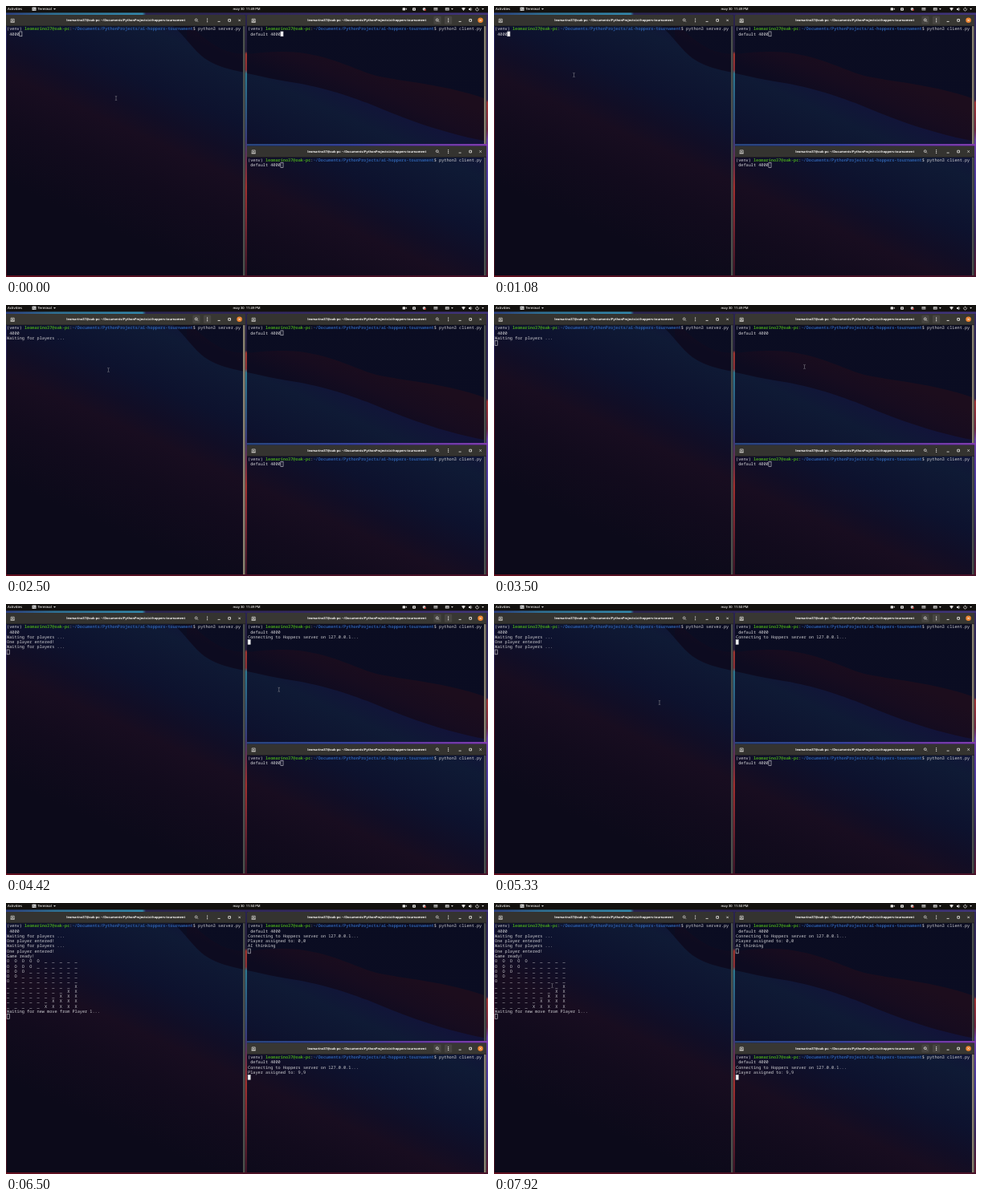
An HTML page for the animation above (8000 ms loop, 600x338 px).

```html
<!DOCTYPE html>
<html lang="en">
<head>
<meta charset="utf-8">
<title>Terminal session</title>
<style>
html, body { margin: 0; width: 100%; height: 100%; overflow: hidden; background: #0c0c20; }
svg { display: block; width: 100vw; height: 100vh; }
text { white-space: pre; text-rendering: geometricPrecision; }
.mono { font: 5.233px "Noto Sans Mono", "DejaVu Sans Mono", monospace; fill: #d2d2d6; }
.user { font-weight: 700; fill: #469f1b; }
.path { font-weight: 700; fill: #2c5ca6; }
.ui { font: 600 4.1px "Open Sans", "Noto Sans", sans-serif; fill: #f0eeec; }
.title { font: 700 3.92px "Open Sans", "Noto Sans", sans-serif; fill: #f8f6f4; text-anchor: middle; }
</style>
</head>
<body>
<svg id="stage" viewBox="0 0 600 338" preserveAspectRatio="none">
  <defs>
    <linearGradient id="sky" x2="0" y2="1">
      <stop offset="0" stop-color="#0b0d22"/><stop offset=".4" stop-color="#0a0c22"/>
    </linearGradient>
    <linearGradient id="ridge" gradientUnits="userSpaceOnUse" x1="430" y1="60" x2="405" y2="118">
      <stop offset="0" stop-color="#1c0d1d"/><stop offset=".5" stop-color="#170c1f"/><stop offset="1" stop-color="#0d0b20"/>
    </linearGradient>
    <linearGradient id="land" gradientUnits="userSpaceOnUse" x1="0" y1="-100" x2="-120" y2="166">
      <stop offset="0" stop-color="#13123a"/><stop offset=".15" stop-color="#0f1a35"/>
      <stop offset=".36" stop-color="#0d122e"/><stop offset=".48" stop-color="#110e26"/>
      <stop offset=".58" stop-color="#180d20"/><stop offset=".75" stop-color="#120b1d"/><stop offset="1" stop-color="#0c0a1a"/>
    </linearGradient>
    <linearGradient id="topStrip">
      <stop offset="0" stop-color="#2c3f80"/><stop offset=".1" stop-color="#2f6f92"/><stop offset=".283" stop-color="#3388ac"/>
      <stop offset=".29" stop-color="#29244f"/><stop offset=".6" stop-color="#33295f"/><stop offset="1" stop-color="#41357c"/>
    </linearGradient>
    <linearGradient id="midStrip" x2="0" y2="1">
      <stop offset="0" stop-color="#2b2450"/><stop offset=".14" stop-color="#231c3a"/>
      <stop offset=".15" stop-color="#a03530"/><stop offset=".21" stop-color="#8a3036"/>
      <stop offset=".225" stop-color="#2d7890"/><stop offset=".36" stop-color="#2d5a82"/>
      <stop offset=".48" stop-color="#3a3a7c"/><stop offset=".56" stop-color="#6e2f4c"/>
      <stop offset=".66" stop-color="#a2302e"/><stop offset=".78" stop-color="#822832"/><stop offset="1" stop-color="#3a1226"/>
    </linearGradient>
    <linearGradient id="rightStrip" x2="0" y2="1">
      <stop offset="0" stop-color="#33285f"/><stop offset=".325" stop-color="#2c2350"/>
      <stop offset=".335" stop-color="#a03336"/><stop offset=".44" stop-color="#722844"/>
      <stop offset=".48" stop-color="#6c40a8"/><stop offset=".66" stop-color="#46389a"/>
      <stop offset=".85" stop-color="#39235a"/><stop offset="1" stop-color="#5a162c"/>
    </linearGradient>
    <linearGradient id="leftStrip" x2="0" y2="1">
      <stop offset="0" stop-color="#2c2c74"/><stop offset=".25" stop-color="#38204c"/>
      <stop offset=".4" stop-color="#64162a"/><stop offset="1" stop-color="#521222"/>
    </linearGradient>
    <linearGradient id="splitStrip">
      <stop offset="0" stop-color="#27457c"/><stop offset=".45" stop-color="#36409a"/>
      <stop offset=".62" stop-color="#5c389e"/><stop offset="1" stop-color="#803cae"/>
    </linearGradient>
    <linearGradient id="bottomStrip">
      <stop offset="0" stop-color="#62101f"/><stop offset=".5" stop-color="#4a1124"/><stop offset="1" stop-color="#481228"/>
    </linearGradient>
  </defs>
</svg>
<script>
const LOOP = 8000, TICK = 1000 / 12;
const CHAR = 3.14, LINE = 6.265;
const HOST = "leomarino37@oak-pc", DIR = "~/Documents/PythonProjects/ai-hoppers-tournament";
const stage = document.getElementById("stage");

function add(parent, tag, attrs, html) {
  const el = document.createElementNS("http://www.w3.org/2000/svg", tag);
  for (const k in attrs) el.setAttribute(k, attrs[k]);
  if (html) el.innerHTML = html;
  parent.appendChild(el);
  return el;
}
const rect = (p, x, y, width, height, fill, more) => add(p, "rect", { x, y, width, height, fill, ...more });
const path = (p, d, fill, more) => add(p, "path", { d, fill, ...more });
const line = (p, d, stroke, more) => path(p, d, "none", { stroke, "stroke-width": 0.7, ...more });
const show = (el, on) => el.setAttribute("visibility", on ? "visible" : "hidden");
const clamp = v => Math.max(0, Math.min(1, v));

function drawWallpaper() {
  rect(stage, 0, 0, 600, 338, "url(#sky)");
  path(stage, "M225 20C250 45 270 60 300 60C325 57 345 56 365 58C410 64 435 80 461 87C490 94 550 98 600 117V180H225Z", "url(#ridge)");
  path(stage, "M0 20H200C222 32 232 58 255 70C270 78 285 80 300 84C320 88 335 92 355 95C400 102 430 114 450 121C490 138 540 158 600 169V338H0Z", "url(#land)");
  rect(stage, 0, 8, 600, 3, "url(#topStrip)");
  rect(stage, 297.6, 11, 2.4, 326, "url(#midStrip)");
  rect(stage, 598, 11, 2, 326, "url(#rightStrip)");
  rect(stage, 300, 172, 300, 2.6, "url(#splitStrip)");
  rect(stage, 0, 11, 0.8, 326, "url(#leftStrip)");
  rect(stage, 0, 336, 600, 2, "url(#bottomStrip)");
}

function drawTopBar() {
  rect(stage, 0, 0, 600, 8.4, "#13110f");
  const label = (x, s, more) => add(stage, "text", { class: "ui", x, y: 5.2, ...more }, s);
  label(2, "Activities");
  rect(stage, 32.5, 1.6, 5, 4.4, "#c9c9c9", { rx: 0.6 });
  line(stage, "M33.5 2.8l1 .9l-1 .9M35.2 4.8h1.4", "#222", { "stroke-width": 0.5 });
  label(39.5, "Terminal");
  path(stage, "M59 3h3l-1.5 1.8z", "#ddd");
  const ink = "#e2e0de";
  rect(stage, 493.6, 2.2, 3.4, 3.2, ink, { rx: 0.5 });
  path(stage, "M497.2 3.7l1.6-1.2v2.6z", ink);
  rect(stage, 506, 2.2, 4, 3.6, ink, { rx: 1 });
  add(stage, "circle", { cx: 508, cy: 4, r: 0.8, fill: "#222" });
  add(stage, "circle", { cx: 520.5, cy: 3.8, r: 1.9, fill: "#c9c6c6" });
  add(stage, "circle", { cx: 521.8, cy: 5, r: 1, fill: "#d84038" });
  rect(stage, 532.5, 2, 4.8, 3.6, "#bbb9b7", { rx: 0.4 });
  line(stage, "M533 3.2h3.8M533 4.4h3.8", "#333", { "stroke-width": 0.4 });
  rect(stage, 546.8, 2.2, 4.8, 3.4, ink, { rx: 0.4 });
  line(stage, "M547.5 3.4h3.4M547.5 4.5h3.4", "#333", { "stroke-width": 0.5 });
  path(stage, "M554 3h2.8l-1.4 1.7z", ink);
  path(stage, "M567 2.8q2.5-1.7 5 0l-2.5 3.2z", ink);
  path(stage, "M576 3.1h1.2l1.4-1.3v4.4l-1.4-1.3h-1.2z", ink);
  line(stage, "M579.4 2.6q.9 1.4 0 2.8", ink, { "stroke-width": 0.5 });
  line(stage, "M585.3 2.6a1.9 1.9 0 1 0 2.4 0M586.5 1.6v2.2", ink);
  path(stage, "M592.2 3h2.8l-1.4 1.7z", ink);
  return label(299.5, "", { "text-anchor": "middle" });
}

const prompt = file => `(venv) <tspan class="user">${HOST}</tspan>:<tspan class="path">${DIR}</tspan>$ python3 ${file}`;

// rows: [time, text]; cursor: [time, row, column, style]
function makeTerminal(x, top, bottom, rows, cursor, focus) {
  const g = add(stage, "g", { transform: `translate(${x} ${top})` });
  const height = bottom - top;
  rect(g, 0, 0, 298, 14, "#343330", { rx: 1 });
  const lit = rect(g, 0, 0, 298, 14, "#383733", { rx: 1 });
  rect(g, 0, 13.6, 298, 0.6, "#1b191b");
  const icons = add(g, "g");
  const tools = add(icons, "g");
  for (const cx of [237, 250.6]) rect(tools, cx - 4.6, 1.8, 9.2, 10, "#474542", { rx: 1.2 });
  const ink = "#efece9";
  line(icons, "M6.2 5.2h4v3.8h-4zM5.4 9.2h5.4M8.2 6v2M7.2 7h2", ink);
  add(icons, "circle", { cx: 236.7, cy: 6.4, r: 1.4, fill: "none", stroke: ink, "stroke-width": 0.8 });
  line(icons, "M237.8 7.5l1.3 1.3", ink);
  for (const cy of [4.9, 6.8, 8.7]) add(icons, "circle", { cx: 250.6, cy, r: 0.65, fill: ink });
  line(icons, "M263.6 8.4h3M276.8 5.5h2.7v2.7h-2.7z", ink, { "stroke-width": 0.9 });
  const close = add(icons, "circle", { cx: 290.6, cy: 6.8, r: 3.3, fill: "#ee8430" });
  line(icons, "M289.4 5.6l2.4 2.4M291.8 5.6l-2.4 2.4", ink, { "stroke-width": 0.8 });
  add(g, "text", { class: "title", x: 149.2, y: 8.1 }, `${HOST}: ${DIR}`);

  rect(g, 295, 14.2, 2.4, height - 14.2, "#4b504c");
  const bar = rect(g, 295, 14.2, 2.4, height - 14.2, "#88816e");

  const texts = rows.map(([at, s], i) =>
    ({ at, el: add(g, "text", { class: "mono", x: 1, y: 19.4 + i * LINE }, s) }));
  const block = rect(g, 0, 0, 3.1, 5.8, "#f2f2f4", { stroke: "#d4d4d8", "stroke-width": 0.6 });

  return (t, q) => {
    texts.forEach(r => show(r.el, t >= r.at));
    const [, row, col, style] = cursor.filter(c => t >= c[0]).pop();
    show(block, style !== "off");
    block.setAttribute("x", 1.1 + col * CHAR);
    block.setAttribute("y", 14.7 + row * LINE);
    block.setAttribute("fill-opacity", style === "full" ? 1 : 0);
    const f = focus(q);
    for (const el of [lit, tools, close, bar]) el.setAttribute("opacity", f);
    icons.setAttribute("opacity", 0.9 + 0.1 * f);
  };
}

function board() {
  const n = 10, out = [];
  for (let r = 0; r < n; r++) {
    let s = "";
    for (let c = 0; c < n; c++) s += (r + c < 5 ? "O" : r + c > 13 ? "X" : "_") + "  ";
    out.push([6410, s]);
  }
  return out;
}

// Pointer stops: [time, x, y]
const stops = [
  [170, 137, 115], [550, 63, 127], [920, 99.5, 86], [2415, 99.5, 86], [2500, 127.5, 81],
  [3250, 386.5, 77], [4080, 386.5, 77], [4165, 389, 77], [4250, 389, 77], [4700, 230, 173],
  [5083, 71, 140], [5333, 206, 123], [5916, 360.5, 225], [6850, 360.5, 225],
  [7333, 123, 84], [7667, 150, 114], [7916, 72.5, 103]
];
const hidden = [[1920, 2495], [3750, 4075], [6330, 6910]];

function pointerAt(t) {
  const i = stops.findIndex(s => s[0] > t);
  if (i === 0) return stops[0].slice(1);
  if (i < 0) return stops[stops.length - 1].slice(1);
  const [t0, x0, y0] = stops[i - 1], [t1, x1, y1] = stops[i];
  const u = (t - t0) / (t1 - t0), e = u * u * (3 - 2 * u);
  return [x0 + (x1 - x0) * e, y0 + (y1 - y0) * e];
}

drawWallpaper();
const clock = drawTopBar();
const fade = (q, start) => clamp((q - start) / 250);
const waiting = "Waiting for players ...", entered = "One player entered!";
const connecting = "Connecting to Hoppers server on 127.0.0.1...";

const terminals = [
  makeTerminal(0, 11, 336,
    [[0, prompt("server.py")], [0, " 4000"], [2080, waiting], [3750, entered], [3750, waiting],
     [6330, entered], [6410, "Game ready!"], ...board(), [6410, "Waiting for new move from Player 1..."]],
    [[0, 1, 5, "open"], [1080, 1, 5, "full"], [1670, 1, 5, "off"], [1920, 2, 0, "full"], [2080, 3, 0, "full"],
     [2500, 3, 0, "off"], [2910, 3, 0, "open"], [3750, 5, 0, "open"], [6330, 6, 0, "open"], [6410, 18, 0, "open"]],
    q => fade(q, 1083) - fade(q, 2916)),
  makeTerminal(300, 11, 172,
    [[0, prompt("client.py")], [0, " default 4000"], [3750, connecting], [6410, "Player assigned to: 0,0"], [6500, "AI thinking"]],
    [[0, 1, 13, "full"], [1080, 1, 13, "open"], [2910, 1, 13, "full"], [3500, 1, 13, "off"], [3750, 3, 0, "full"],
     [5830, 3, 0, "open"], [6410, 4, 0, "open"], [6500, 5, 0, "open"]],
    q => 1 - fade(q, 1083) + fade(q, 2916) - fade(q, 5833)),
  makeTerminal(300, 174.7, 336,
    [[0, prompt("client.py")], [0, " default 4000"], [6330, connecting], [6410, "Player assigned to: 9,9"]],
    [[0, 1, 13, "open"], [5830, 1, 13, "full"], [6330, 3, 0, "full"], [6410, 4, 0, "full"]],
    q => fade(q, 5833))
];
const pointer = line(stage, "M-1.2 -2.6Q0 -2.6 0 -1.8Q0 -2.6 1.2 -2.6M0 -1.8V1.8M-1.2 2.6Q0 2.6 0 1.8Q0 2.6 1.2 2.6", "#8c8c94", { "stroke-width": 0.55 });

function draw(t) {
  const q = Math.floor((t + 4) / TICK) * TICK;
  clock.textContent = "may 30  11:" + (t < 4660 ? "49" : "50") + " PM";
  terminals.forEach(update => update(t, q));
  const [x, y] = pointerAt(q);
  pointer.setAttribute("transform", `translate(${x} ${y})`);
  show(pointer, !hidden.some(([a, b]) => t >= a && t < b));
}

const start = performance.now();
function tick() {
  draw((performance.now() - start) % LOOP);
  requestAnimationFrame(tick);
}
tick();
</script>
</body>
</html>
```
